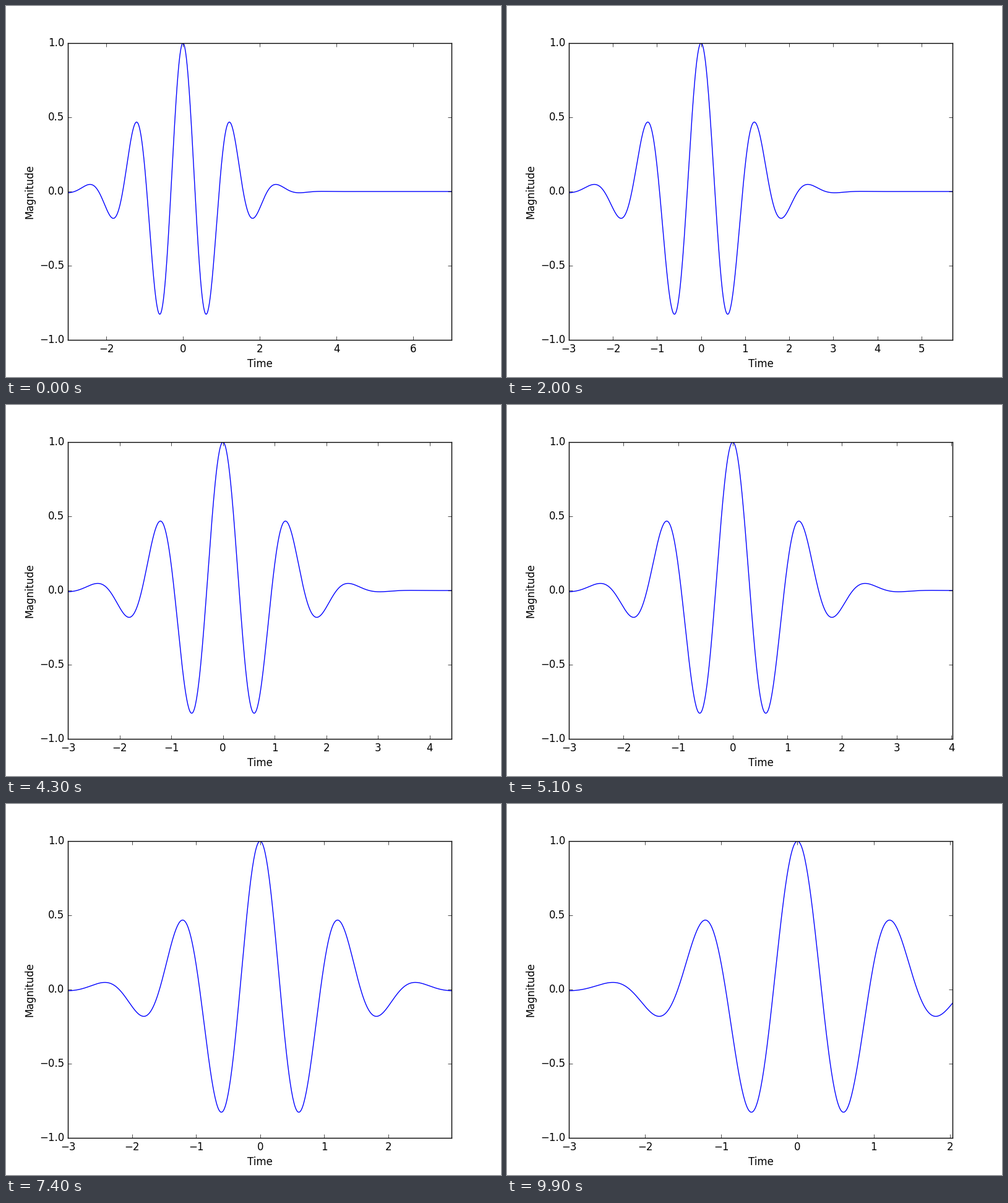
A matplotlib script for the animation above (10 s loop, 800 px wide and 600 px high).

```python
import matplotlib.pyplot as plt
import numpy as np
from matplotlib.animation import FuncAnimation

FRAMES = 100
T_MIN, SPAN = -3, 10

plt.style.use("classic")
plt.rcParams["font.family"] = "DejaVu Sans"


def wavelet(t):
    return np.exp(-t**2 / 2) * np.cos(5 * t)


fig, ax = plt.subplots(figsize=(8, 6), dpi=100, facecolor="white")
t = np.linspace(T_MIN, T_MIN + SPAN, 1001)
ax.plot(t, wavelet(t), color="blue", lw=1)
ax.set_ylim(-1, 1)
ax.set_xlabel("Time")
ax.set_ylabel("Magnitude")


def update(i):
    # The visible span halves over one loop.
    ax.set_xlim(T_MIN, T_MIN + SPAN * 0.5 ** (i / FRAMES))
    return []


anim = FuncAnimation(fig, update, frames=FRAMES, interval=100,
                     init_func=lambda: update(0), repeat=True, repeat_delay=0)
plt.show()
```
